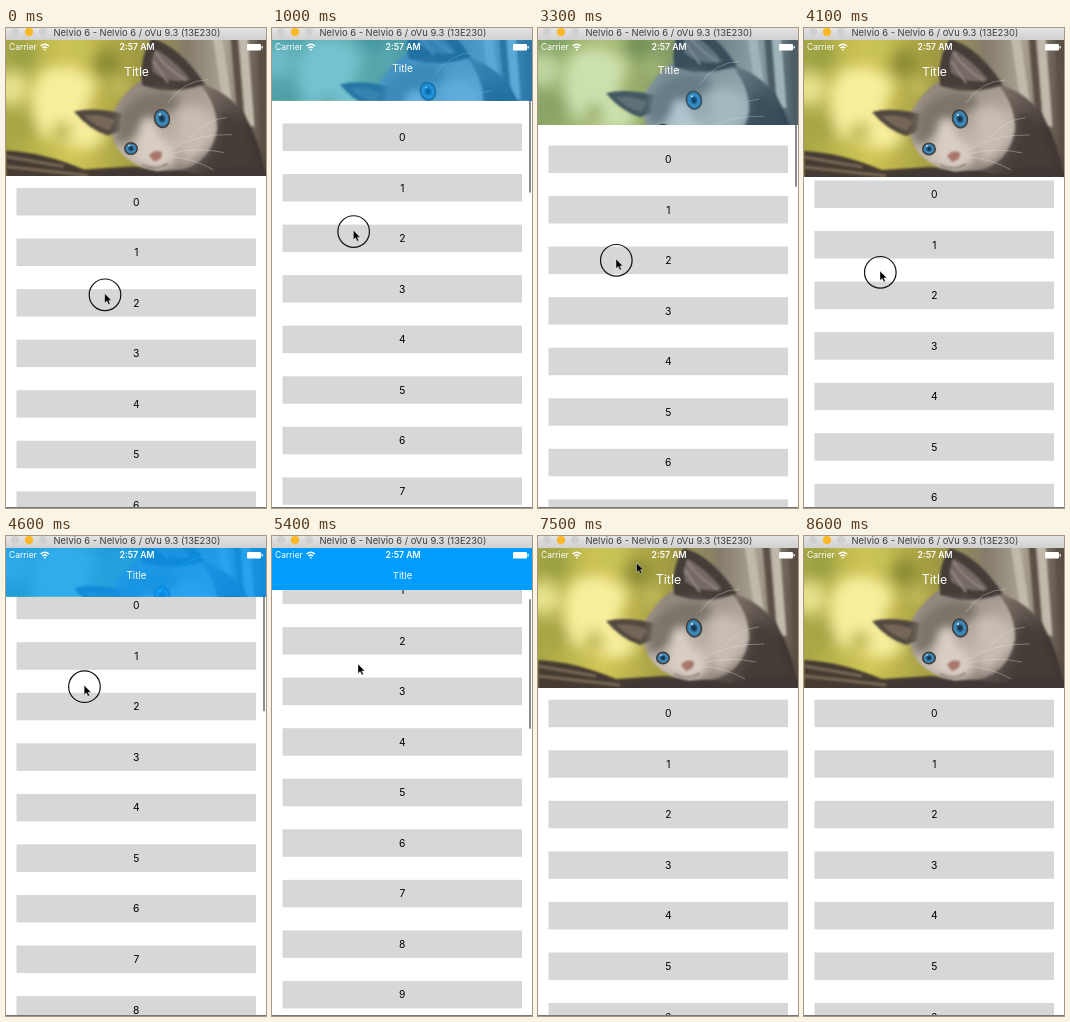
These frames come from a looping animation (260x480 px, 8.7 s). An HTML page:

```html
<!DOCTYPE html>
<html lang="en">
<head>
<meta charset="utf-8">
<title>Collapsing header</title>
<style>
  html, body { margin: 0; width: 100%; height: 100%; overflow: hidden; background: #fff; }
  svg { display: block; width: 100%; height: 100%; font-family: Inter, Roboto, sans-serif; }
  text { text-anchor: middle; }
</style>
</head>
<body>
<svg viewBox="0 0 260 480">
  <defs>
    <linearGradient id="bar" x2="0" y2="1">
      <stop stop-color="#e4e4e4"/><stop offset="1" stop-color="#d0d0d0"/>
    </linearGradient>
    <linearGradient id="garden">
      <stop stop-color="#a8a645"/><stop offset=".25" stop-color="#d0c655"/>
      <stop offset=".5" stop-color="#a29b42"/><stop offset=".7" stop-color="#857c6c"/>
      <stop offset=".84" stop-color="#aaa294"/><stop offset="1" stop-color="#564a40"/>
    </linearGradient>
    <linearGradient id="body" x2=".9" y2=".5">
      <stop stop-color="#8d8378"/><stop offset=".5" stop-color="#796d64"/><stop offset="1" stop-color="#3d3632"/>
    </linearGradient>
    <linearGradient id="face" x1=".2" x2=".6" y2="1">
      <stop stop-color="#8b8177"/><stop offset=".4" stop-color="#aba197"/>
      <stop offset=".75" stop-color="#c4bab0"/><stop offset="1" stop-color="#8c8179"/>
    </linearGradient>
    <radialGradient id="iris">
      <stop stop-color="#10222f"/><stop offset=".3" stop-color="#1d4a69"/>
      <stop offset=".6" stop-color="#4690c0"/><stop offset="1" stop-color="#296387"/>
    </radialGradient>
    <filter id="soft" x="-50%" y="-50%" width="200%" height="200%"><feGaussianBlur stdDeviation="7"/></filter>
    <filter id="blur" x="-30%" y="-30%" width="160%" height="160%"><feGaussianBlur stdDeviation="4"/></filter>
    <filter id="fuzz" x="-20%" y="-20%" width="140%" height="140%"><feGaussianBlur stdDeviation="1.2"/></filter>
    <clipPath id="headerClip"><rect id="headerBox" y="12" width="260"/></clipPath>
  </defs>

  <rect width="260" height="480" fill="#fff"/>
  <g id="rows"></g>
  <rect id="scrollbar" x="257" width="2" height="130" rx="1" fill="#8c8c8c"/>

  <g clip-path="url(#headerClip)">
    <g id="photo">
      <rect y="0" width="260" height="156" fill="url(#garden)"/>
      <g filter="url(#soft)">
        <path d="M26 68Q30 38 56 40T90 60L78 84 102 110 82 124 52 116 28 104Z" fill="#f8ee9c"/>
        <circle cx="5" cy="62" r="17" fill="#e8e18d"/>
        <circle cx="16" cy="28" r="15" fill="#98a143"/>
        <circle cx="18" cy="100" r="14" fill="#a7a442"/>
        <circle cx="72" cy="22" r="13" fill="#c8c257"/>
        <circle cx="101" cy="36" r="14" fill="#8b8c35"/>
        <circle cx="115" cy="60" r="9" fill="#c5bd5e"/>
        <circle cx="56" cy="105" r="10" fill="#bcb34c"/>
      </g>
      <g filter="url(#fuzz)" fill="none">
        <path d="M211 8L222 80M237 8L244 100" stroke="#c1b9ab" stroke-width="9"/>
        <path d="M228 8L235 90M255 8L260 130" stroke="#5b5045" stroke-width="7"/>
      </g>
      <path d="M0 124Q38 126 78 143L125 140 260 144V156H0Z" fill="#453a30" filter="url(#fuzz)"/>
      <path d="M0 130L58 140M0 140L82 149" fill="none" stroke="#796757" stroke-width="3" filter="url(#fuzz)"/>
      <g filter="url(#fuzz)">
        <path d="M185 54Q223 64 239 89Q254 115 260 150L150 150 130 90Z" fill="url(#body)"/>
        <path d="M106 87Q120 62 139 52L190 53Q211 75 211 103Q204 136 176 143Q151 150 129 137Q111 128 107 110Z" fill="url(#face)"/>
        <path d="M68 85Q87 80 116 87L114 105 102 109Q83 103 68 85Z" fill="#514941"/>
        <path d="M78 89Q94 87 109 94L103 104Q89 100 78 89Z" fill="#756659"/>
        <path d="M136 59Q133 30 146 12Q174 20 199 58Q174 66 154 64Z" fill="#443d38"/>
        <path d="M147 45Q144 31 150 23Q169 34 184 53Q163 58 147 45Z" fill="#756963"/>
        <path d="M149 25Q157 39 180 54M147 34L162 56" fill="none" stroke="#9c9187" stroke-width="1.5"/>
      </g>
      <g filter="url(#blur)">
        <path d="M112 88Q129 62 161 64Q180 72 169 82L145 94 121 116 109 116Z" fill="#7d746b"/>
        <path d="M135 97Q146 82 152 108L168 125Q172 138 152 143Q136 140 130 130Z" fill="#d8cec4"/>
        <path d="M172 86Q192 72 205 94Q205 125 178 136Z" fill="#c7bdb2"/>
        <path d="M216 85Q240 91 254 142L210 143Z" fill="#453c37"/>
      </g>
      <path d="M84 151Q121 139 151 145Q174 142 190 147L260 145V156H84Z" fill="#403936" filter="url(#fuzz)"/>
      <path d="M136 138Q149 145 162 137" fill="none" stroke="#72645b" stroke-width="1.2" filter="url(#fuzz)"/>
      <path d="M143 129Q149 122 156 126Q157 133 148 135Z" fill="#a8776a" filter="url(#fuzz)"/>
      <g stroke="#443c37" stroke-width="1.4">
        <ellipse cx="156" cy="92" rx="7.5" ry="9" fill="url(#iris)" transform="rotate(-15 156 92)"/>
        <ellipse cx="125" cy="122" rx="6.3" ry="5.8" fill="url(#iris)"/>
      </g>
      <g fill="#e7f2f8"><circle cx="154" cy="88" r="1"/><circle cx="123" cy="119" r=".8"/></g>
      <path d="M163 124Q190 107 226 108M165 127Q190 120 218 126M163 130Q188 132 207 143M162 76Q177 54 202 53M184 112Q202 92 221 91"
            fill="none" stroke="#e9e2da" stroke-width=".6" opacity=".6"/>
    </g>
    <rect id="tint" y="12" width="260" height="142" fill="#009dff"/>
  </g>

  <g fill="#fff">
    <text id="title" x="130.5">Title</text>
    <text x="3" y="22" font-size="8.5" style="text-anchor:start">Carrier</text>
    <text x="131" y="22" font-size="8.7" font-weight="600">2:57 AM</text>
    <path d="M34.5 18Q38.8 14.5 43 18M36.3 20Q38.8 18 41.2 20" fill="none" stroke="#fff" stroke-width="1.3"/>
    <circle cx="38.8" cy="21.7" r=".9"/>
    <rect x="241" y="16" width="14" height="6.5" rx="1.2"/>
    <rect x="255.5" y="18" width="1.3" height="2.5" rx=".6"/>
  </g>

  <rect width="260" height="12" fill="url(#bar)"/>
  <circle cx="9" cy="4" r="4.2" fill="#d0d0d0"/>
  <circle cx="23" cy="4" r="4.2" fill="#fcb827"/>
  <circle cx="37" cy="4" r="4.2" fill="#d0d0d0"/>
  <text x="131" y="8" font-size="9.4" fill="#3c3c3c">Nelvio 6 - Nelvio 6 / oVu 9.3 (13E230)</text>
  <rect y="479" width="260" height="1" fill="#777"/>

  <g id="pointer">
    <circle id="press" r="15.8" cx=".3" cy="1.3" fill="none" stroke="#111" stroke-width="1.2"/>
    <path d="M0 0V9.5L2.2 7.5 3.8 10.9 5.4 10.2 3.9 6.9H6.8Z" fill="#000" stroke="#fff" stroke-width=".4"/>
  </g>
</svg>

<script>
const LOOP = 8700, STEP = 100, ROW_GAP = 50.55, ROW_COUNT = 12;
const HEADER_MIN = 54, HEADER_MAX = 152;

// Each track is a list of [time, value] pairs.
const listTop = [[0, 160], [2000, 31], [2200, 31], [3300, 117.5], [3750, 158], [4100, 152.5],
  [4900, 5], [5400, -10], [5600, -10], [6200, 178], [6400, 171.5], [6900, 163.7]];
const headerBottom = [[0, 148], [1400, 54], [2400, 54], [3300, 97], [3750, 152], [4100, 149],
  [4700, 54], [5750, 54], [6150, 152]];
const pointerX = [[0, 98.7], [2000, 64], [3300, 78], [4100, 76], [5400, 86], [6400, 98.5]];
const pointerY = [[0, 265.5], [2000, 139], [2200, 139], [3300, 231], [3750, 250], [4100, 243],
  [4800, 128], [5600, 128], [6200, 280], [6900, 280], [7700, -20]];

const el = id => document.getElementById(id);
const set = (id, attrs) => {
  for (const name in attrs) el(id).setAttribute(name, attrs[name]);
};

// Monotone cubic interpolation: smooth, without overshooting the keys.
function sample(keys, t) {
  const last = keys.length - 1;
  if (t >= keys[last][0]) return keys[last][1];
  const i = keys.findIndex(key => key[0] > t) - 1;
  const slope = k => k < 0 || k >= last ? 0 :
    (keys[k + 1][1] - keys[k][1]) / (keys[k + 1][0] - keys[k][0]);
  const tangent = k => {
    const a = slope(k - 1), b = slope(k);
    return a * b > 0 ? 2 * a * b / (a + b) : 0;
  };
  const [t0, v0] = keys[i], [t1, v1] = keys[i + 1];
  const span = t1 - t0, u = (t - t0) / span, w = 1 - u;
  return v0 * w * w * (1 + 2 * u) + v1 * u * u * (3 - 2 * u)
    + span * u * w * (tangent(i) * w - tangent(i + 1) * u);
}

el("rows").innerHTML = Array.from({ length: ROW_COUNT }, (_, i) =>
  `<g transform="translate(0 ${i * ROW_GAP})">
    <rect x="10.5" width="239.5" height="27.5" fill="#d7d7d7"/>
    <text x="130.3" y="17.5" font-size="10.3">${i}</text>
  </g>`).join("");

function draw(t) {
  const top = sample(listTop, t), bottom = sample(headerBottom, t);
  const collapsed = (HEADER_MAX - bottom) / (HEADER_MAX - HEADER_MIN);

  set("rows", { transform: `translate(0 ${top})` });
  set("scrollbar", { y: 52 - (top - 31) * 0.267 });
  set("headerBox", { height: bottom - 12 });
  set("photo", { transform: `translate(0 ${(bottom - HEADER_MAX) * 0.36})` });
  set("tint", { opacity: collapsed ** 3 });
  set("title", { y: 48 - 5.5 * collapsed ** 2, "font-size": 12.4 - 2.9 * collapsed });

  const pressed = t < 4900 || (t >= 5600 && t < 6300);
  set("pointer", { transform: `translate(${sample(pointerX, t)} ${sample(pointerY, t)})` });
  set("press", { visibility: pressed ? "visible" : "hidden" });
}

function frame() {
  const t = performance.now() % LOOP;
  draw(Math.floor(t / STEP) * STEP);
  requestAnimationFrame(frame);
}
frame();
</script>
</body>
</html>
```
